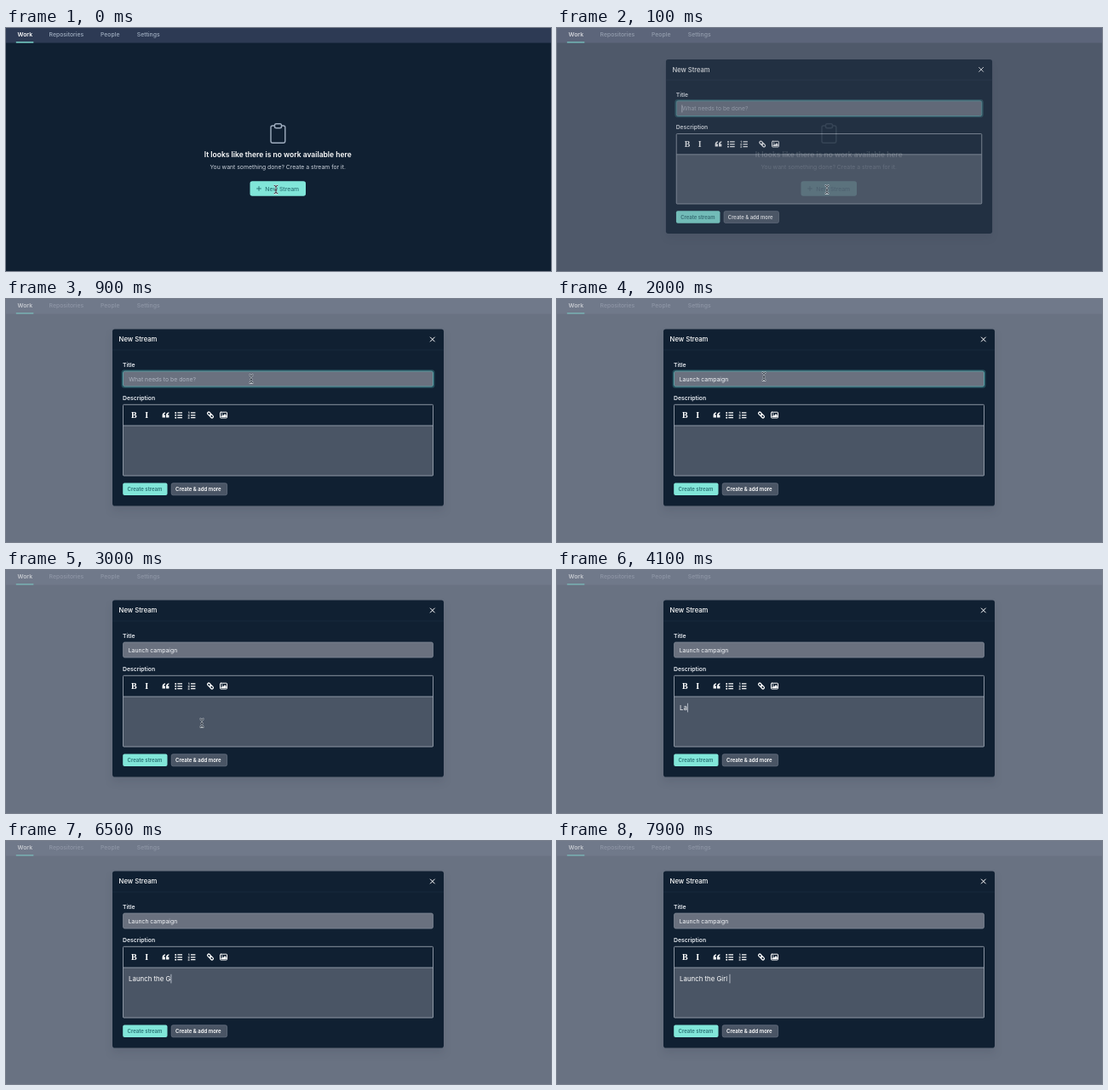
An HTML page that plays this animation: 640 by 286 pixels, repeating every 8 s.

```html
<!DOCTYPE html>
<html lang="en">
<head>
<meta charset="utf-8">
<title>New Stream</title>
<style>
  html, body { margin: 0; width: 100%; height: 100%; overflow: hidden; background: #102032; }
  svg { display: block; width: 100vw; height: 100vh; }
  text { font: 500 6.85px Inter, sans-serif; fill: #fff; white-space: pre; }
  .nav { fill: #a0aec0; }
  .strong, .label { font-weight: 600; }
  .label { fill: #e8ecf2; }
  .heading { font-size: 8.5px; text-anchor: middle; }
  .sub { font-weight: 400; fill: #cbd2dc; text-anchor: middle; }
  .modal-title { font-size: 7.7px; }
  .small { font-size: 6px; font-weight: 600; }
  .dark { fill: #2a7476; }
  .field { font-weight: 400; fill: #f3f5f8; }
  .hint { font-weight: 400; fill: #abb2be; }
  .body { font-size: 7.85px; font-weight: 400; }
  .serif { font: bold 10px "Liberation Serif", serif; text-anchor: middle; }
  .line { fill: none; stroke: #fff; stroke-linecap: round; }
  .caret { stroke: #ccd2dc; stroke-width: .8; }
  #modal { filter: drop-shadow(0 6px 5px rgba(20, 30, 50, .1)); }
</style>
</head>
<body>
<svg viewBox="0 0 640 286" preserveAspectRatio="none">
  <rect width="640" height="286" fill="#102032"/>
  <rect width="640" height="17.5" fill="#2d3a54"/>
  <text class="nav" x="50.6" y="9.6">Repositories</text>
  <text class="nav" x="111" y="9.6">People</text>
  <text class="nav" x="153.8" y="9.6">Settings</text>

  <g fill="none" stroke="#a0aec0" stroke-width="1.4">
    <path d="M315.5 115H313a2 2 0 0 0-2 2V133a2.2 2.2 0 0 0 2.2 2.2H325.600a2.200 2.200 0 0 0 2.200-2.200V117a2 2 0 0 0-2-2H323.500"/>
    <rect x="315.500" y="112.800" width="8" height="5" rx="1.800"/>
  </g>
  <text class="heading strong" x="319.200" y="152">It looks like there is no work available here</text>
  <text class="sub" x="319.200" y="165.600">You want something done? Create a stream for it.</text>
  <rect x="286.500" y="180.300" width="65.500" height="17.500" rx="2.800" fill="#81e6d9"/>
  <path d="M294.200 189h5.600m-2.800-2.800v5.600" fill="none" stroke="#2a7476"/>
  <text class="dark" x="304.300" y="191.500">New Stream</text>

  <rect id="veil" width="640" height="286" fill="#878e9c"/>
  <g id="active">
    <text class="strong" x="13.500" y="9.600">Work</text>
    <rect x="11.800" y="16.200" width="20.500" height="1.300" fill="#81e6d9"/>
  </g>

  <g id="modal">
    <rect x="125" y="35.500" width="389" height="208" rx="2.800" fill="#102032"/>
    <path d="M125 60H514" stroke="#1b2b40" stroke-width=".7"/>
    <text class="modal-title" x="132.600" y="50.300">New Stream</text>
    <path class="line" d="M498.300 45l5 5m0-5l-5 5"/>

    <text class="label" x="137" y="79.800">Title</text>
    <rect id="glow" x="136.300" y="83.900" width="366.400" height="20.200" rx="2.800" fill="none" stroke="#3d8a90" stroke-opacity=".45" stroke-width="1.500"/>
    <rect id="input" x="137.500" y="85" width="364" height="18" rx="2" fill="#6a717f"/>
    <text class="hint" id="hint" x="144.300" y="96.600">What needs to be done?</text>
    <text class="field" id="title" x="143.700" y="96.600"></text>
    <path class="caret" id="titleCaret" d="M0 89.800v9"/>

    <text class="label" x="137" y="119.200">Description</text>
    <rect x="137.500" y="149" width="364" height="59" fill="#4a5565"/>
    <path d="M137.500 149H501.500" stroke="#98a1ae" stroke-width=".9"/>
    <rect x="137.500" y="124.300" width="364" height="83.700" rx="1" fill="none" stroke="#98a1ae" stroke-width=".9"/>

    <text class="serif" x="150.400" y="139.900">B</text>
    <text class="serif" x="165.300" y="139.900" font-style="italic">I</text>
    <g fill="#fff">
      <path id="quote" d="M187 133.200q-3.400.6-3.400 3.800v2.400h3.400v-3h-1.700q.1-1.500 1.700-2z"/>
      <use href="#quote" x="4.400"/>
      <circle cx="199.200" cy="133.900" r="1"/>
      <circle cx="199.200" cy="136.800" r="1"/>
      <circle cx="199.200" cy="139.700" r="1"/>
    </g>
    <path d="M201.300 133.900h5.700m-5.700 2.900h5.700m-5.700 2.900h5.700M217 133.900h5.400m-5.400 2.900h5.400m-5.400 2.900h5.400" stroke="#fff" stroke-width="1.300"/>
    <path d="M214.300 133.200l.7-.4v2.200m-1 1.400h1.300l-1.200 1.300h1.300m-1.400 1.300h1.300l-.6.8.6.8h-1.300" class="line" stroke-width=".6"/>
    <g class="line" stroke-width="1.200" transform="rotate(45 240 136.500)">
      <rect x="235.800" y="135" width="4.800" height="3" rx="1.500"/>
      <rect x="239.400" y="135" width="4.800" height="3" rx="1.500"/>
    </g>
    <rect class="line" x="251.500" y="133.200" width="8" height="6.800" rx=".8"/>
    <path d="M252.500 139v-1.200l1.600-1.500 1 1 2-2.200 1.600 1.800v2.100z" fill="#fff"/>
    <circle cx="253.700" cy="135.200" r=".7" fill="#fff"/>

    <text class="body" id="body" x="144.100" y="165"></text>
    <path class="caret" id="bodyCaret" d="M0 156.800v10.600"/>

    <rect x="137.200" y="216.500" width="52.300" height="14.500" rx="2" fill="#81e6d9"/>
    <text class="small dark" x="142.500" y="226">Create stream</text>
    <rect x="194.200" y="216.800" width="65.400" height="14" rx="2" fill="#4a5565" stroke="#6d7787" stroke-width=".7"/>
    <text class="small" x="199" y="226">Create &amp; add more</text>
  </g>

  <g id="pointer" fill="none">
    <path id="beam" d="M-2.300-4.600Q0-4.600 0-3Q0-4.600 2.300-4.600M0-3V3M-2.300 4.600Q0 4.600 0 3Q0 4.600 2.300 4.600M-1.300.8H1.300" stroke="#e6eaee" stroke-opacity=".8" stroke-width="1.900"/>
    <use href="#beam" style="stroke:#111"/>
    <path d="M-2.300-4.600Q0-4.600 0-3Q0-4.600 2.300-4.600M0-3V3M-2.300 4.600Q0 4.600 0 3Q0 4.600 2.300 4.600M-1.300.8H1.300" stroke="#16202c" stroke-width=".9"/>
  </g>
</svg>
<script>
const LOOP = 8000, STEP = 100, BLINK = 500;
const TITLE = "Launch campaign", BODY = "Launch the Girl ";
const FOCUS_BODY = 2400;

// Keys are [time, value, value...]
const titleKeys = [[1200, 0], [1700, TITLE.length]];
const bodyKeys = [[3700, 0], [4100, 2], [6500, 12], [7900, BODY.length]];
const pointerKeys = [[300, 317, 190], [900, 288, 94], [1800, 288, 94], [2000, 243, 91], [2100, 243, 91], [2500, 230, 180]];

const el = id => document.getElementById(id);
const show = (node, on) => node.style.display = on ? "" : "none";
const blinkOn = age => Math.floor(age / BLINK) % 2 === 0;

function along(keys, t) {
  if (t <= keys[0][0]) return keys[0].slice(1);
  for (let i = 1; i < keys.length; i++) {
    const a = keys[i - 1], b = keys[i];
    if (t <= b[0]) {
      const k = (t - a[0]) / (b[0] - a[0]);
      return a.slice(1).map((v, j) => v + (b[j + 1] - v) * k);
    }
  }
  return keys[keys.length - 1].slice(1);
}

function type(id, text, keys, t, caretOn) {
  const node = el(id), caret = el(id + "Caret");
  const count = Math.floor(along(keys, t)[0] + 1e-6);
  node.textContent = text.slice(0, count);
  const x = +node.getAttribute("x") + (count ? node.getComputedTextLength() : 0) + .5;
  caret.setAttribute("transform", `translate(${x} 0)`);
  show(caret, caretOn);
  return count;
}

function draw(t) {
  const open = t < 700 ? 1 - .3 ** (t / 100) : 1;
  const scale = .95 + .05 * open;
  el("veil").setAttribute("opacity", .75 * open);
  el("active").setAttribute("opacity", 1 - .4 * open);
  el("modal").setAttribute("opacity", open);
  el("modal").setAttribute("transform", `translate(319.5 139.5) scale(${scale}) translate(-319.5 -139.5)`);

  const onTitle = t < FOCUS_BODY;
  show(el("glow"), onTitle);
  el("input").setAttribute("stroke", onTitle ? "#5a9ca2" : "#868e9b");
  el("input").setAttribute("stroke-width", onTitle ? 1 : .7);

  const typingTitle = t >= 1300 && t < 1900;
  const titleCaret = onTitle && (typingTitle || t < 1300 && blinkOn(t));
  show(el("hint"), !type("title", TITLE, titleKeys, t, titleCaret));

  const typingBody = t >= 3700;
  type("body", BODY, bodyKeys, t, !onTitle && (typingBody || blinkOn(t - FOCUS_BODY)));

  const [x, y] = along(pointerKeys, t);
  el("pointer").setAttribute("transform", `translate(${x} ${y})`);
  show(el("pointer"), !typingTitle && !typingBody);
}

function tick() {
  const t = performance.now() % LOOP;
  draw(Math.floor(t / STEP) * STEP);
  requestAnimationFrame(tick);
}
tick();
</script>
</body>
</html>
```
